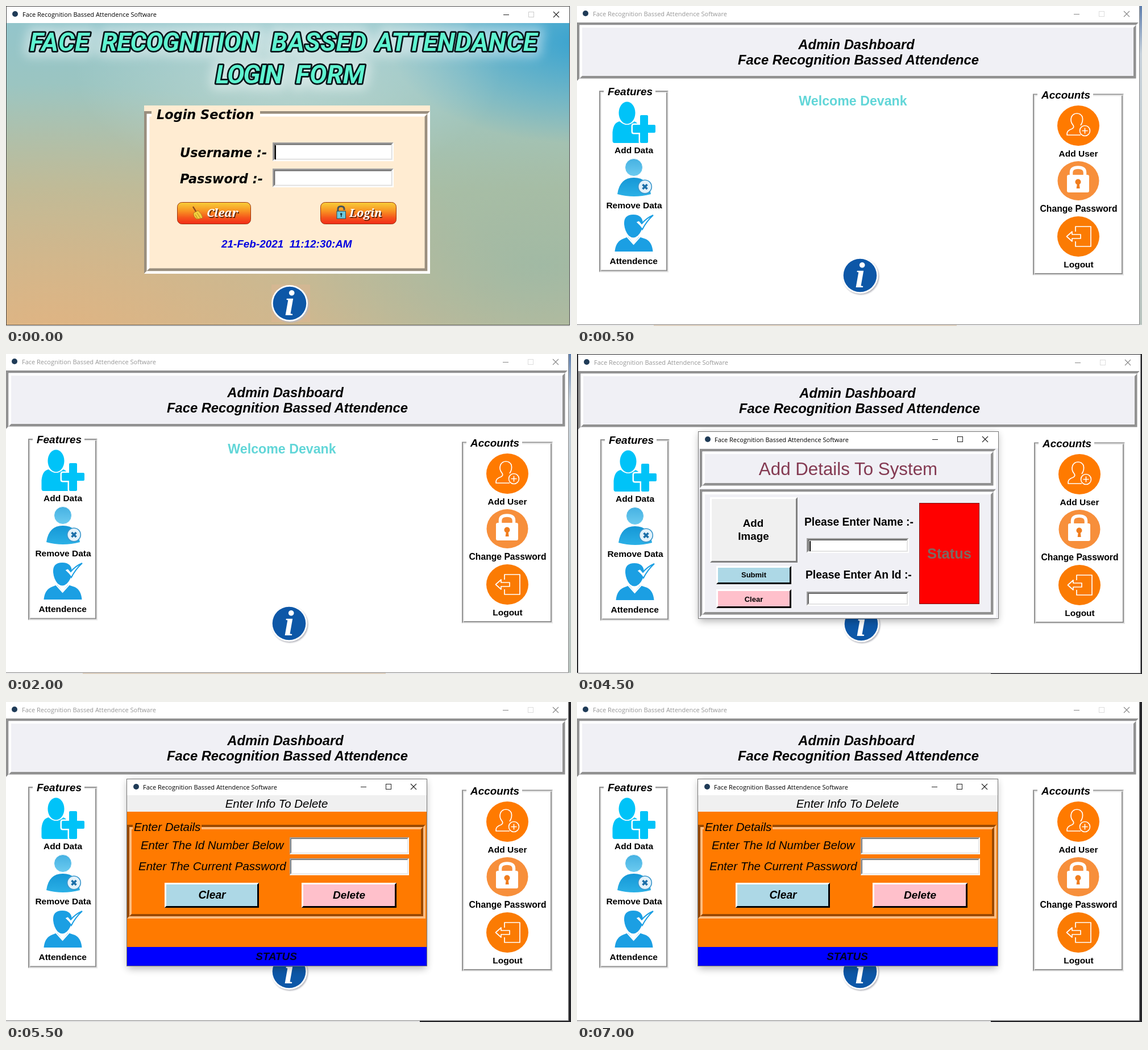
Recreate the animation shown at these times as an HTML page. Size 994 by 563 pixels, loop 8 s.

```html
<!DOCTYPE html>
<html lang="en">
<head>
<meta charset="utf-8">
<title>Attendance software</title>
<style>
html, body { margin: 0; width: 100%; height: 100%; overflow: hidden; background: #fff; }
svg { display: block; width: 994px; height: 563px; }
text { white-space: pre; font-family: "Liberation Sans", Arial, sans-serif; }
.b { font-weight: 700; }
.i { font-style: italic; }
.bar { font: 11px "Open Sans", "Noto Sans", sans-serif; }
.form { font: italic 700 22.4px "DejaVu Sans", Verdana, sans-serif; }
.btn { font: italic 700 20px "Noto Serif", Georgia, serif; }
.info { font: italic 700 64px "Liberation Serif", serif; }
.banner { font: italic 700 45px Roboto, sans-serif; }
.mid { text-anchor: middle; }
</style>
</head>
<body>
<svg id="stage" viewBox="0 0 994 563" xmlns="http://www.w3.org/2000/svg"></svg>
<script>
const LOOP = 8000;
const STARTS = [0, 500, 3000, 5500];
const TITLE = 'Face Recognition Bassed Attendence Software';
const GRAY = '#919191';

const rect = (x, y, w, h, fill, more = '') =>
  `<rect x="${x}" y="${y}" width="${w}" height="${h}" fill="${fill}" ${more}/>`;
const path = (d, fill = 'none', more = '') => `<path d="${d}" fill="${fill}" ${more}/>`;
const oval = (x, y, rx, ry, fill, more = '') =>
  `<ellipse cx="${x}" cy="${y}" rx="${rx}" ry="${ry}" fill="${fill}" ${more}/>`;
const text = (s, x, y, size, cls = '', fill = '#000', more = '') =>
  `<text x="${x}" y="${y}" font-size="${size}" class="${cls}" fill="${fill}" ${more}>${s}</text>`;
const line = (d, color, w, more = '') => path(d, 'none', `stroke="${color}" stroke-width="${w}" ${more}`);
const group = (s, x = 0, y = 0) => `<g transform="translate(${x} ${y})">${s}</g>`;

// Two-tone edge of width b inside the given box
function bevel(x, y, w, h, b, tl, br) {
  const r = x + w, d = y + h;
  return path(`M${x} ${d}V${y}H${r}l${-b} ${b}H${x + b}V${d - b}Z`, tl) +
    path(`M${x} ${d}H${r}V${y}l${-b} ${b}V${d - b}H${x + b}Z`, br);
}
const groove = (x, y, w, h, b, dark, light) =>
  bevel(x, y, w, h, b, dark, light) +
  bevel(x + b, y + b, w - 2 * b, h - 2 * b, b, light, dark);
const entry = (x, y, w, h, b = 2) => rect(x, y, w, h, '#fff') +
  bevel(x, y, w, h, b, '#a0a0a0', '#fff') +
  bevel(x + b, y + b, w - 2 * b, h - 2 * b, b, '#696969', '#e3e3e3');
const button = (x, y, w, h, fill, br = '#000') =>
  rect(x, y, w, h, fill) + bevel(x, y, w, h, 3, '#fff', br);

const dot = (x, y) => oval(x, y, 5, 5, '#1f3b57');

// Caption buttons; (x, y) is the middle of the close cross
function controls(x, y, color, maxColor) {
  return line(`M${x - 93} ${y + .5}h10`, color, 1) +
    rect(x - 48.5, y - 4.5, 9, 9, 'none', `stroke="${maxColor}"`) +
    line(`M${x - 5} ${y - 5}l10 10m0 -10l-10 10`, color, 1.1);
}

const infoIcon = (x, y) =>
  oval(x + 1.5, y + 2, 32, 32, '#b9b9c0', 'filter="url(#soft)"') +
  oval(x, y, 32, 32, '#fff') + oval(x, y, 29.3, 29.3, '#0d57a7') +
  text('i', x, y + 21, 64, 'info mid', '#fff');

function banner() {
  // word, x, baseline, tracking
  const words = [['FACE', 42, 79, .7], ['RECOGNITION', 168, 79, -.9], ['BASSED', 467, 79, .7],
    ['ATTENDANCE', 651, 79, .6], ['LOGIN', 369, 136, -2], ['FORM', 510, 136, .3]];
  const draw = more => words.map(([s, x, y, gap]) =>
    text(s, x, y, 45, 'banner', '#5ff3d0', `letter-spacing="${gap}" ${more}`)).join('');
  return draw('stroke="#fff" stroke-width="22" stroke-linejoin="round" opacity=".42" filter="url(#glow)"') +
    draw('stroke="#061418" stroke-width="5.5" stroke-linejoin="round" paint-order="stroke"');
}

function glossy(x, w, label, tx) {
  return rect(x + .5, 345.5, w, 38, 'url(#fire)', 'rx="8" stroke="#9c3410"') +
    text(label, tx + 1.5, 372.5, 20, 'btn', '#5a2408') + text(label, tx, 371, 20, 'btn', '#fff');
}

function login() {
  const sand = '#ffecd2', dark = '#998e7e';
  const broom = line('M329 353L335 363', '#8a4a1c', 2.4) +
    path('M330 364L338 360Q345 366 346 373L336 375Q329 371 330 364Z', '#f4cf3c', 'stroke="#a5701c" stroke-width=".8"') +
    line('M333 367L337 374M336 364L342 373', '#a5701c', .8);
  const lock = line('M584 361V357Q584 352.5 589.5 352.5Q595 352.5 595 357V359', '#46525a', 3) +
    rect(582, 361, 15.5, 13, '#6cc8dc', 'stroke="#23505e"') +
    oval(589.7, 366, 1.8, 1.8, '#17303a') + rect(589, 366, 1.5, 5, '#17303a');
  return rect(0, 0, 994, 563, '#f2f2f2') + rect(0, 0, 992, 562, '#4a4a4a') +
    rect(1, 1, 990, 29, '#fff') + rect(1, 30, 990, 531, 'url(#sky)') +
    ['warm', 'blue', 'olive', 'mist'].map(id => rect(1, 30, 990, 531, `url(#${id})`)).join('') +
    dot(16, 14) + text(TITLE, 29, 19, 11, 'bar') + controls(968, 15, '#222', '#ccc') +
    `<g clip-path="url(#client)">${banner()}</g>` +
    rect(243, 175, 503, 296, sand) + groove(243, 185, 503, 286, 4.7, dark, '#fff') +
    rect(256, 178, 191, 25, sand) + text('Login Section', 265, 199, 22.4, 'form') +
    text('Username :-', 306, 266, 22.4, 'form') + text('Password :-', 306, 312, 22.4, 'form') +
    entry(469, 240, 213, 33, 2.2) + entry(469, 286, 213, 33, 2.2) + rect(473, 245, 2, 25, '#000') +
    glossy(301, 129, 'Clear', 353) + broom + glossy(553, 133, 'Login', 604) + lock +
    text('21-Feb-2021  11:12:30:AM', 379, 425, 18.9, 'b i', '#0000e0') +
    rect(467, 490, 68, 66, '#e0b594', 'opacity=".4"') + infoIcon(499, 523);
}

function features() {
  const cyan = '#00c3f8', blue = '#1b9fe3';
  const plus = 'M113 192h10q2 0 2 2v15h11q2 0 2 2v10q0 2 -2 2h-11v16q0 2 -2 2h-10q-2 0 -2 -2v-16h-11q-2 0 -2 -2v-10q0 -2 2 -2h11v-15q0 -2 2 -2Z';
  const add = oval(88, 188, 14.5, 19.5, cyan) +
    path('M66 241Q62 241 62.5 235V222Q64 205 75 203Q88 215 101 203Q109 206 110 216V241Z', cyan) +
    path(plus, cyan, 'stroke="#fff" stroke-width="5" paint-order="stroke"');
  const remove = path('M71 331Q75 302 100 302Q126 302 130 331Q100 339 71 331Z', 'url(#torso)') +
    oval(100, 284, 15.5, 15.5, 'url(#azure)', 'stroke="#fff" stroke-width="1"') +
    oval(119.5, 318, 11.8, 11.8, '#e4f2fa', 'stroke="#3b97cc" stroke-width="1.6"') +
    line('M115.5 314l8 8m0 -8l-8 8', '#1c6fa8', 3.6);
  const attend = path('M83 384Q82 367 99 367Q116 367 116 384Q115 396 107 404Q99 411 91 404Q84 396 83 384Z', blue) +
    path('M66.5 432Q68 415 80 410L90 406L99.5 418L109 406L121 410Q132 415 133.5 432Z', blue) +
    line('M88 406L99.5 419L111 406', '#fff', 2) +
    path('M103 380L109 377L114 383Q122 373 134 368Q122 379 115 393Q110 386 103 380Z', '#fff', `stroke="${blue}" stroke-width="2"`);
  return groove(39, 149, 122, 319.5, 2, GRAY, '#e6e6e6') + rect(47, 146, 91, 12, '#fff') +
    text('Features', 54, 157, 18.95, 'b i') + add + remove + attend +
    text('Add Data', 100, 259, 15.5, 'b mid') + text('Remove Data', 100.5, 356, 15.5, 'b mid') +
    text('Attendence', 99.7, 454, 15.5, 'b mid');
}

function accounts() {
  const thin = 'stroke-linejoin="round"';
  const user = oval(882, 210.5, 37, 35.5, '#ff7a00') +
    line('M886 227H862Q861 219 871 216Q875 214 873 210Q867 203 870 195Q873 189 879.5 189Q886 189 889 195Q891 203 886 210', '#fff', 1.7, thin) +
    oval(893.5, 219.5, 9, 9, '#ff7a00', 'stroke="#fff" stroke-width="1.6"') +
    line('M888.5 219.5h10m-5 -5v10', '#fff', 1.6);
  const lock = oval(882, 307.5, 36.5, 34.5, '#f78f3b') +
    line('M869.5 299V293Q869.5 284 881.5 284Q893.5 284 893.5 293V299', '#fff', 5.5) +
    rect(862, 297, 39, 31, '#fff', 'rx="3"') + oval(881.5, 309.5, 5, 5, '#f07d1e') +
    path('M880 311h3.5l1.2 10h-6Z', '#f07d1e');
  const out = oval(882, 405.5, 37, 35.5, '#fb7b03') +
    line('M877 397V388H904V423H877V414M861.5 405.5L871 397V402H886V409H871V414Z', '#fff', 1.7, thin);
  return groove(802, 154.5, 160, 319.5, 2, GRAY, '#e6e6e6') + rect(810, 151, 98, 12, '#fff') +
    text('Accounts', 817, 163, 18.9, 'b i') + user + lock + out +
    text('Add User', 882, 265, 15.5, 'b mid') + text('Change Password', 882.5, 362, 15.7, 'b mid') +
    text('Logout', 882.5, 460, 15.5, 'b mid');
}

function dashboard() {
  return rect(0, 0, 990, 561, '#fff') +
    dot(15, 13) + text(TITLE, 28, 18, 11, 'bar', '#979797') + controls(967, 14, '#888', '#ddd') +
    rect(0, 29, 988, 103, '#f0f0f5') + groove(0, 29, 988, 103, 4.5, GRAY, '#fff') +
    text('Admin Dashboard', 491.5, 76, 23.75, 'b i mid') +
    text('Face Recognition Bassed Attendence', 495, 103, 23.75, 'b i mid') +
    text('Welcome Devank', 485.5, 175, 23.2, 'b mid', '#62d6d8') +
    features() + accounts() + infoIcon(498, 474) +
    line('M989.5 0V561', '#8a8a8a', 1) + line('M0 560.5H990', '#8a8a8a', 1);
}

// Child window; its body is drawn relative to its own corner
function popup(x, y, body) {
  return group(rect(2, 4, 525, 330, '#000', 'opacity=".3" filter="url(#shade)"') +
    rect(0, 0, 529, 330, '#777') + rect(1, 1, 527, 328, '#fff') + dot(17, 14) +
    text(TITLE, 29, 18.5, 11, 'bar') + controls(505, 14, '#222', '#222') + body, x, y);
}

function addForm() {
  const fill = '#f0f0f5';
  return rect(1, 30, 527, 299, fill) +
    groove(3, 31, 521, 69, 4.5, GRAY, '#fff') + groove(3, 102, 521, 225, 4.5, GRAY, '#fff') +
    text('Add Details To System', 264, 76.5, 31.3, 'mid', '#843a52') +
    button(21, 116, 154, 115, '#f0f0f0', '#808080') +
    text('Add', 97, 168, 18.8, 'b mid') + text('Image', 97.5, 191, 18.8, 'b mid') +
    button(32, 237, 132, 32, '#add8e6') + text('Submit', 98, 257, 13, 'b mid') +
    button(32, 278, 132, 33, '#ffc0cb') + text('Clear', 98, 300, 13, 'b mid') +
    text('Please Enter Name :-', 187, 166, 19.3, 'b') + entry(191, 188, 180, 26) + rect(196, 193, 2, 18, '#000') +
    text('Please Enter An Id :-', 189, 259, 19.3, 'b') + entry(191, 282, 180, 25) +
    rect(389.5, 126.5, 105, 177, '#f00', 'stroke="#7a1010"') +
    text('Status', 442, 224, 25.5, 'b mid', '#7d6a62');
}

function deleteForm() {
  const orange = '#ff7a00';
  return rect(1, 29, 527, 30, '#f0f0f0') + text('Enter Info To Delete', 264, 50.5, 20.4, 'i mid') +
    rect(1, 58, 527, 238, orange) + groove(1, 81, 525, 165, 4, '#994900', '#ffbc80') +
    rect(11, 75, 121, 20, orange) + text('Enter Details', 13, 92, 20.5, 'i') +
    text('Enter The Id Number Below', 25, 124, 20.4, 'i') + entry(287, 103, 210, 30, 1.5) +
    text('Enter The Current Password', 21, 161, 20.5, 'i') + entry(287, 140, 210, 29.5, 1.5) +
    button(67, 183, 166, 44, '#add8e6') + text('Clear', 150.5, 211, 19.3, 'b i mid') +
    button(308, 183, 167, 44, '#ffc0cb') + text('Delete', 391.5, 211, 19, 'b i mid') +
    rect(1, 296, 527, 33, '#00f') + text('STATUS', 263.5, 319, 18.8, 'b i mid', '#000022');
}

const stops = list => list.map(([at, c, o = 1]) => `<stop offset="${at}" stop-color="${c}" stop-opacity="${o}"/>`).join('');
const linear = (id, list) => `<linearGradient id="${id}" x1="0" y1="0" x2="0" y2="1">${stops(list)}</linearGradient>`;
const radial = (id, x, y, r, color, op) =>
  `<radialGradient id="${id}" cx="${x}" cy="${y}" r="${r}">${stops([[0, color, op], [.45, color, op * .55], [1, color, 0]])}</radialGradient>`;
const blur = (id, n) => `<filter id="${id}" x="-30%" y="-60%" width="160%" height="220%"><feGaussianBlur stdDeviation="${n}"/></filter>`;

const defs = '<defs>' +
  linear('sky', [[0, '#93c5cb'], [.25, '#9dc5bf'], [.55, '#acbfa5'], [1, '#bebb9b']]) +
  radial('warm', .08, 1.05, .85, '#e4b37f', .9) + radial('blue', 1.02, .06, .34, '#2f9fd0', .9) +
  radial('olive', .95, .8, .45, '#98b8a6', .7) + radial('mist', .5, .16, .38, '#d3e6e3', .5) +
  linear('fire', [[0, '#f8cf3a'], [.4, '#f89322'], [.7, '#f5571c'], [1, '#f22a18']]) +
  linear('azure', [[0, '#45b1e2'], [1, '#6ccbf0']]) +
  linear('torso', [[0, '#1597d6'], [1, '#2bb0e6']]) +
  linear('edge', [[0, '#5f7fae'], [.15, '#c9d3dc'], [1, '#b9c4bf']]) +
  blur('soft', 1.2) + blur('glow', 9) + blur('shade', 7) +
  '<clipPath id="client"><rect x="1" y="30" width="990" height="531"/></clipPath></defs>';

const desk = rect(0, 0, 994, 563, '#26262a') + rect(0, 561, 728, 2, '#e6e6e6');
const scenes = [
  login(),
  rect(0, 0, 994, 563, '#eee') + rect(990, 0, 4, 561, 'url(#edge)') +
    rect(135, 561, 533, 2, '#e3d5c4') + dashboard(),
  desk + group(dashboard(), 2, 1) + popup(213, 136, addForm()),
  desk + dashboard() + popup(212, 135, deleteForm())
];

const stage = document.getElementById('stage');
stage.innerHTML = defs + scenes.map(s => `<g class="scene" display="none">${s}</g>`).join('');
const layers = [...stage.querySelectorAll('.scene')];

function render(ms) {
  const t = ms % LOOP;
  const now = STARTS.filter(s => s <= t).length - 1;
  layers.forEach((el, i) => el.setAttribute('display', i === now ? 'inline' : 'none'));
}

const begin = performance.now();
function tick() {
  render(performance.now() - begin);
  requestAnimationFrame(tick);
}
render(0);
requestAnimationFrame(tick);
</script>
</body>
</html>
```
